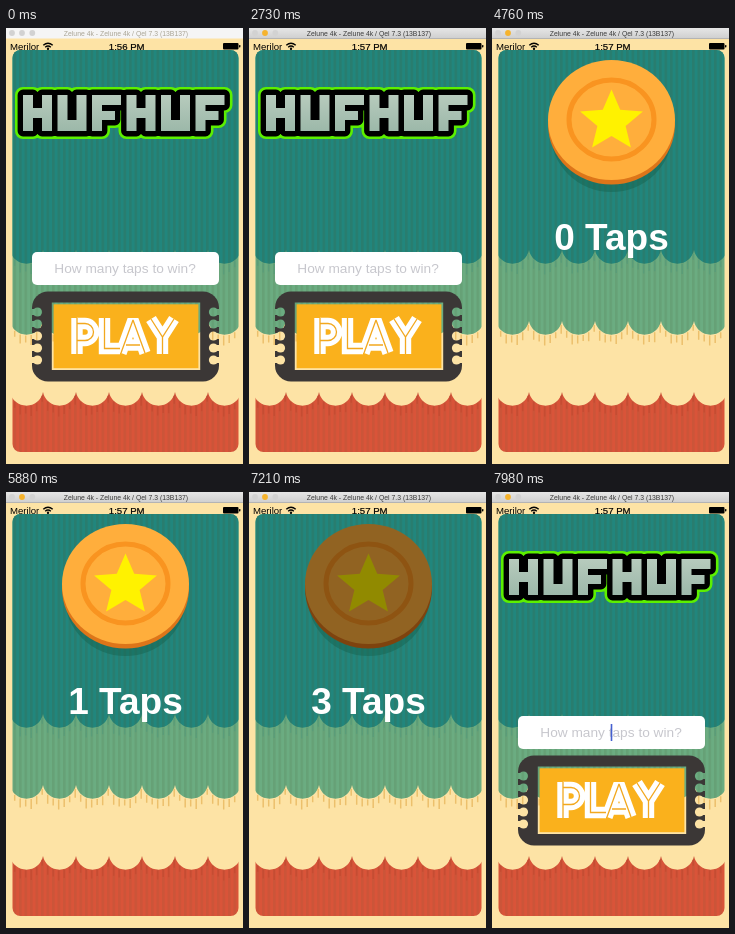
These frames come from a looping animation (237x436 px, 8 s). An HTML page:

```html
<!DOCTYPE html>
<html lang="en">
<head>
<meta charset="utf-8">
<title>Tap counter</title>
<style>
  html, body { margin: 0; width: 100%; height: 100%; overflow: hidden; background: #fde3a5; }
  svg { display: block; width: 237px; height: 436px; font-family: "Liberation Sans", Arial, sans-serif; }
  .pressed { filter: brightness(.57); }
  .mid { text-anchor: middle; }
</style>
</head>
<body>
<svg viewBox="0 0 237 436">
  <defs>
    <pattern id="stripes" x="7.5" width="5.5" height="20" patternUnits="userSpaceOnUse">
      <rect width="2.6" height="20" fill="#4a5a35"/>
    </pattern>
    <linearGradient id="activeBar" x2="0" y2="1">
      <stop stop-color="#e6e6e6"/><stop offset="1" stop-color="#cfcfcf"/>
    </linearGradient>
    <linearGradient id="metal" x2="0" y2="1">
      <stop stop-color="#b7cbbd"/><stop offset="1" stop-color="#9cb8a9"/>
    </linearGradient>
    <clipPath id="sheet"><rect x="6.5" y="22" width="226" height="402" rx="8"/></clipPath>
    <mask id="ticket">
      <rect x="26" y="263.5" width="187" height="90" rx="16" fill="#fff"/>
      <rect x="45.8" y="274.5" width="148.4" height="67.5"/>
      <g id="bites"/>
    </mask>
  </defs>

  <rect width="237" height="436" fill="#fde3a5"/>
  <g id="curtain" clip-path="url(#sheet)"></g>

  <g id="menu">
    <g id="logo" role="img" aria-label="HUFHUF" stroke-linejoin="round"></g>
    <rect x="26" y="224" width="187" height="33" rx="5" fill="#fff"/>
    <text id="hint" class="mid" x="119" y="245" font-size="13.7" fill="#c7c7cd">How many taps to win?</text>
    <text id="entry" class="mid" x="119" y="245" font-size="13.7">5</text>
    <rect id="caret" y="232" width="1.6" height="17" fill="#4560d0"/>
    <g id="play" role="img" aria-label="PLAY">
      <rect x="26" y="263" width="187" height="91" fill="#3b3736" mask="url(#ticket)"/>
      <rect x="47.6" y="276.3" width="144.8" height="63.9" fill="#fab11c"/>
      <g fill="none" stroke-miterlimit="2" id="word"></g>
    </g>
  </g>

  <g id="game">
    <ellipse cx="119.5" cy="104" rx="61" ry="60" fill="#155f4c" opacity=".45"/>
    <g id="coin">
      <ellipse cx="119.5" cy="96.5" rx="63.5" ry="60" fill="#dd7519"/>
      <ellipse cx="119.5" cy="92" rx="63.5" ry="60" fill="#ffae3c"/>
      <ellipse cx="119.5" cy="91.5" rx="42.5" ry="39.5" fill="none" stroke="#f99420" stroke-width="5"/>
      <polygon id="star" fill="#fff200"/>
    </g>
    <text id="score" class="mid" x="119.5" y="222" font-size="37" font-weight="700" fill="#fff"></text>
  </g>

  <g id="bar">
    <rect id="barFill" width="237" height="10.5"/>
    <rect id="barEdge" y="10" width="237" height="1" fill="#b4b4b4"/>
    <circle cx="6" cy="5" r="2.9" fill="#d2d2d2"/>
    <circle id="light" cx="16" cy="5" r="2.9"/>
    <circle cx="26.3" cy="5" r="2.9" fill="#d2d2d2"/>
    <text id="title" class="mid" x="120" y="7.6" font-size="6.87">Zelune 4k - Zelune 4k / Qel 7.3 (13B137)</text>
  </g>

  <text x="4" y="21.6" font-size="9.6">Merilor</text>
  <g fill="none" stroke="#000" stroke-width="1.4">
    <path d="M37.3 17.3Q42 13 46.7 17.3M39.2 19.2Q42 16.8 44.8 19.2"/>
    <circle cx="42" cy="20.8" r=".5"/>
  </g>
  <text id="clock" class="mid" x="120.7" y="21.7" font-size="9.6" stroke="#000" stroke-width=".2"></text>
  <rect x="217" y="15" width="15.5" height="6.4" rx="1"/>
  <rect x="233" y="17" width="1.4" height="2.4" rx=".6"/>
</svg>
<script>
const $ = id => document.getElementById(id);
const LOOP = 8000, SCALLOP = 33, RADIUS = 16.8, FIRST = 4;
const SAG = Math.sqrt(RADIUS ** 2 - (SCALLOP / 2) ** 2);

// Panel between a flat edge and a row of hanging arcs
function panel(flat, cusp, color, shade) {
  let d = `M${FIRST} ${flat}V${cusp}`;
  for (let k = 1; k <= 7; k++) d += `A${RADIUS} ${RADIUS} 0 0 0 ${FIRST + SCALLOP * k} ${cusp}`;
  d += `V${flat}Z`;
  return `<path d="${d}" fill="${color}"/><path d="${d}" fill="url(#stripes)" opacity="${shade}"/>`;
}

// Short threads below the arcs
function threads(cusp, color) {
  let d = "";
  for (let i = 0; i < 41; i++) {
    const x = 8.7 + 5.5 * i;
    const off = (x - FIRST) % SCALLOP - SCALLOP / 2;
    const y = cusp + Math.sqrt(RADIUS ** 2 - off ** 2) - SAG;
    d += `M${x} ${y + 1}V${y + 7 + (i * 3) % 5}`;
  }
  return `<path d="${d}" stroke="${color}" stroke-width="1.5"/>`;
}

$("curtain").innerHTML =
  panel(22, 293, "#6bac81", .14) + threads(293, "#ecc06c") +
  panel(22, 222, "#21867d", .2) + threads(222, "#5a9d79") +
  panel(424, 364, "#d95439", .1) + threads(364, "#c64c32");

$("bites").innerHTML = [284, 296, 308, 320, 332].map(y =>
  [26, 213].map(x => `<rect x="${x - 6}" y="${y - 3}" width="12" height="6"/>` +
    `<circle cx="${x === 26 ? 31.5 : 207.5}" cy="${y}" r="4.6"/>`).join("")).join("");

const blocks = {
  H: "v36h10v-13h9v13h10v-36h-10v13h-9v-13z",
  U: "v36h29v-36h-10v25h-9v-25z",
  F: "v36h10v-11h13v-9h-13v-6h19v-10z"
};
const logo = [..."HUFHUF"].map((c, i) => `M${17 + 34.5 * i} 67${blocks[c]}`).join("");
$("logo").innerHTML =
  `<path d="${logo}" fill="none" stroke="#5cf000" stroke-width="16"/>` +
  `<path d="${logo}" fill="none" stroke="#000" stroke-width="10.8"/>` +
  `<path d="${logo}" fill="url(#metal)"/>`;

const word = "M71 290V326M71 295.5H79a8.5 8.5 0 0 1 0 17H71" +
  "M98.5 290V320.5H114M115 325L127 292L139 325M120 317H134" +
  "M145 291L156.5 309L168 291M156.5 308V326";
$("word").innerHTML =
  `<path d="${word}" stroke="#fff" stroke-width="11.4"/>` +
  `<path d="${word}" stroke="#f2a81f" stroke-width="1.3"/>`;

$("star").setAttribute("points", Array.from({ length: 10 }, (_, i) => {
  const a = Math.PI * i / 5, r = i % 2 ? 0.45 : 1;
  return `${119.5 + 33 * r * Math.sin(a)},${93.5 - 32 * r * Math.cos(a)}`;
}).join(" "));

const CARET = [
  [0, 0], [2030, 1], [2590, .66], [2660, .33], [2730, 0],
  [3080, .33], [3150, .66], [3220, 1],
  [3780, .66], [3850, .33], [3920, 0],
  [4270, .33], [4340, .66], [4410, 1]
];
const PRESS = [5670, 6160, 6650, 7210, 7770];
const RELEASE = [5880, 6370, 6860, 7420, 7980];

const stepAt = (steps, t) => steps.filter(s => s[0] <= t).pop()[1];
const count = (times, t) => times.filter(s => s <= t).length;
const show = (id, on) => { $(id).style.display = on ? "" : "none"; };
const fill = (id, color) => $(id).setAttribute("fill", color);

function draw(t) {
  const active = t >= 1260, ended = t >= 7980;
  const playing = t >= 4760 && !ended;
  const typed = t >= 3220 && !ended;
  const taps = count(RELEASE, t);

  fill("barFill", active ? "url(#activeBar)" : "#f5f5f5");
  fill("title", active ? "#3c3c3c" : "#aaa596");
  fill("light", active ? "#f6b32c" : "#d2d2d2");
  show("barEdge", active);
  $("clock").textContent = t < 700 ? "1:56 PM" : "1:57 PM";

  show("menu", !playing);
  show("game", playing);
  show("hint", !typed);
  show("entry", typed);
  $("caret").setAttribute("x", ended ? 118.7 : typed ? 122.4 : 47.3);
  $("caret").style.opacity = stepAt(CARET, t);
  $("play").classList.toggle("pressed", t >= 4410 && !ended);
  $("coin").classList.toggle("pressed", count(PRESS, t) > taps);
  $("score").textContent = `${taps} Taps`;
}

const start = performance.now();
function tick() {
  draw((performance.now() - start) % LOOP);
  requestAnimationFrame(tick);
}
tick();
</script>
</body>
</html>
```
